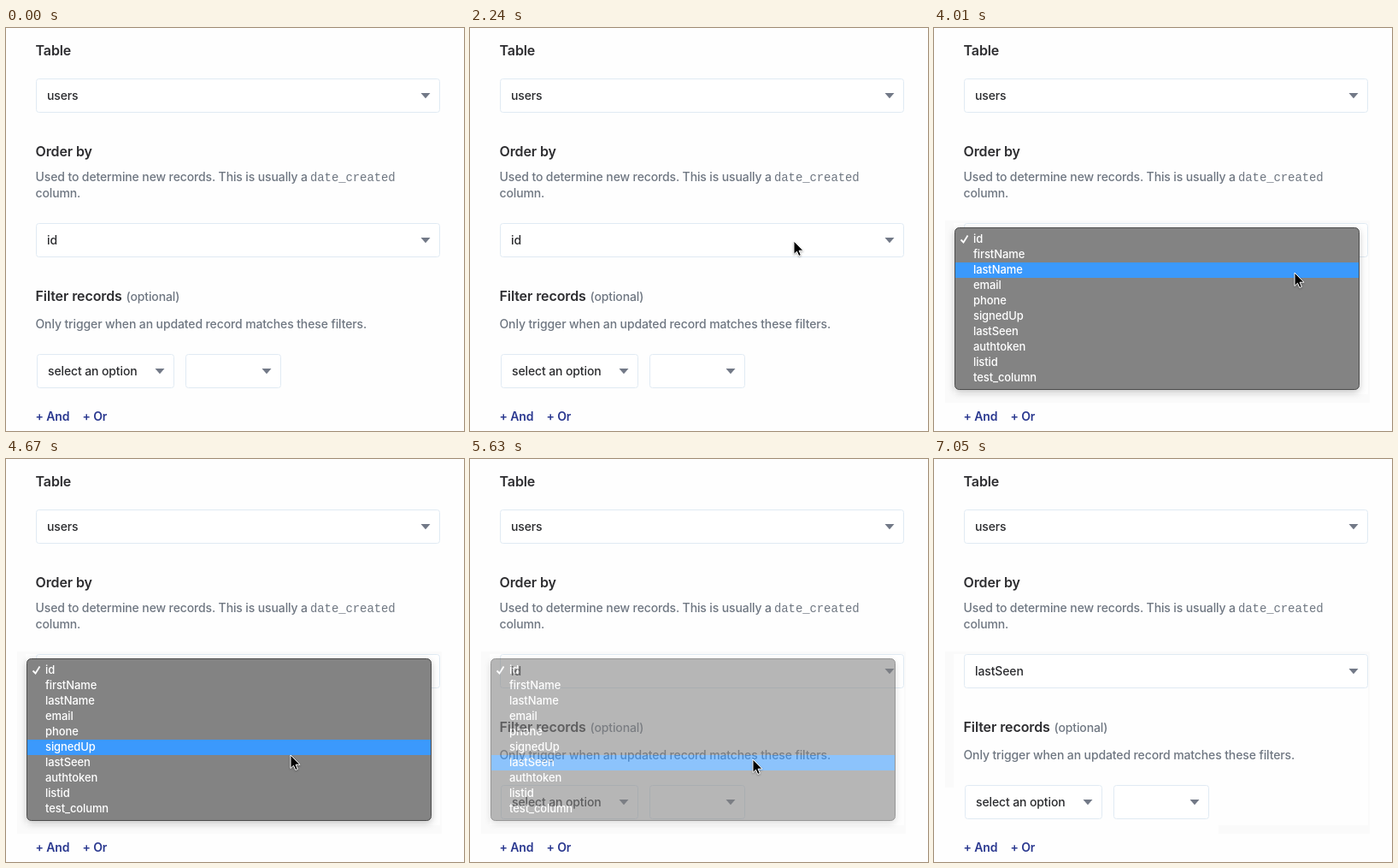
Animation of 536x471 px, one loop 8.91 s. Source, as an HTML page:

```html
<!DOCTYPE html>
<html lang="en">
<head>
<meta charset="utf-8">
<title>Order by menu</title>
<style>
  html, body { margin: 0; width: 100%; height: 100%; overflow: hidden; background: #fefefe; }
  svg { display: block; }
  text { font: 500 14px Inter, sans-serif; letter-spacing: -.12px; fill: #2b2c2f; }
  .title { font-weight: 600; font-size: 16px; letter-spacing: -.1px; fill: #2d2d30; }
  .note { fill: #6e7681; }
  .code { font: 14px "Liberation Mono", monospace; letter-spacing: -.1px; }
  .link { font-weight: 600; fill: #2b3990; }
  .box { fill: #fff; stroke: #e0eaf3; }
  .arrow { fill: #727987; }
  #menu text { font-size: 13px; letter-spacing: -.1px; fill: #fff; }
  #panel { fill: #838383; stroke: #4c4c4c; filter: drop-shadow(0 3px 4px rgba(0, 0, 0, .22)); }
  #cursor { filter: drop-shadow(0 1px 1px rgba(0, 0, 0, .3)); }
</style>
</head>
<body>
<svg width="536" height="471" viewBox="0 0 536 471">
  <g id="halo" fill="#fafafa">
    <path d="M13 225H510V228H23V384H13ZM508 228H510V438H333V428H508Z"/>
    <path id="haloCorner" d="M13 384H23V428H333V438H13Z"/>
  </g>
  <text class="title" x="34.5" y="32">Table</text>
  <text class="title" x="34.5" y="150">Order by</text>
  <text class="note" x="34.5" y="179">Used to determine new records. This is usually a</text>
  <text class="note code" x="356" y="179">date_created</text>
  <text class="note" x="34.5" y="198">column.</text>
  <text class="title" x="34.5" y="319">Filter records</text>
  <text class="note" x="140.5" y="319">(optional)</text>
  <text class="note" x="34.5" y="351">Only trigger when an updated record matches these filters.</text>
  <text class="link" x="34.5" y="459">+ And</text>
  <text class="link" x="89.5" y="459">+ Or</text>
  <g id="selects"></g>
  <g id="menu">
    <rect id="panel" x="24.5" y="233.5" width="473" height="189" rx="5"/>
    <rect id="highlight" x="25" width="472" height="18" fill="#3b99fc"/>
    <path d="M31.5 247.5L34.5 250.5 39.5 242.5" fill="none" stroke="#fff" stroke-width="1.8"/>
  </g>
  <path id="cursor" d="M0 0V15.5L3.5 12.2 5.8 17.5 8.4 16.4 6.1 11.2H11Z" stroke="#fff" stroke-width="1"/>
</svg>
<script>
const LOOP = 8910;
const ROW_TOP = 238, ROW_HEIGHT = 18;
const COLUMNS = ["id", "firstName", "lastName", "email", "phone", "signedUp",
  "lastSeen", "authtoken", "listid", "test_column"];

const $ = id => document.getElementById(id);

function add(parent, tag, attributes, content = "") {
  const node = document.createElementNS("http://www.w3.org/2000/svg", tag);
  for (const name in attributes) node.setAttribute(name, attributes[name]);
  node.textContent = content;
  parent.append(node);
  return node;
}

function addSelect(x, y, width, label) {
  const group = $("selects");
  add(group, "rect", { class: "box", x: x + .5, y: y + .5, width: width - 1, height: 39, rx: 3 });
  add(group, "path", { class: "arrow", d: `M${x + width - 22.5} ${y + 17}h11l-5.5 6.2z` });
  return add(group, "text", { x: x + 13, y: y + 25 }, label);
}

addSelect(35, 59, 473, "users");
const orderBy = addSelect(35, 228, 473, "id");
addSelect(36, 381, 161, "select an option");
addSelect(210, 381, 112, "");

COLUMNS.forEach((name, i) =>
  add($("menu"), "text", { x: 46, y: ROW_TOP + 13 + i * ROW_HEIGHT }, name));

const linear = u => u;
const easeIn = u => u * u;
const easeOut = u => 1 - (1 - u) ** 1.72;
const smooth = u => u * u * (3 - 2 * u);

// Cursor moves, each advancing in evenly spaced hard steps
const MOVES = [
  { start: 1190, end: 1600, steps: 8, from: [-12, 232], to: [181, 252], ease: easeOut },
  { start: 1890, end: 2710, steps: 15, from: [181, 252], to: [481, 248], ease: easeOut },
  { start: 3660, end: 4550, steps: 16, from: [481, 248], to: [335, 342], ease: smooth },
  { start: 4610, end: 4850, steps: 5, from: [335, 342], to: [331, 351], ease: linear },
  { start: 6580, end: 7050, steps: 9, from: [331, 351], to: [304, 474], ease: easeIn },
];

const MENU_OPEN = 2770, BLINK = 5450, BLINK_END = 5510, FADE = 5570, MENU_CLOSED = 5800;

function cursorAt(t) {
  const move = MOVES.findLast(m => t >= m.start);
  if (!move) return [-20, 232];
  const { start, end, steps, from, to, ease } = move;
  const step = Math.floor((t - start + 5) / (end - start) * (steps - 1)) + 1;
  const u = ease(Math.min(step / steps, 1));
  return from.map((a, i) => a + (to[i] - a) * u);
}

function menuOpacity(t) {
  if (t < MENU_OPEN || t >= MENU_CLOSED) return 0;
  if (t < FADE) return 1;
  return .8 - .22 * Math.floor((t - FADE) / 60);
}

function show(id, visible) {
  $(id).style.display = visible ? "" : "none";
}

function draw(t) {
  const [x, y] = cursorAt(t);
  $("cursor").setAttribute("transform", `translate(${Math.round(x)} ${Math.round(y)})`);

  const row = Math.floor((y - ROW_TOP) / ROW_HEIGHT);
  $("highlight").setAttribute("y", ROW_TOP + row * ROW_HEIGHT);
  show("highlight", t < BLINK || t >= BLINK_END);
  $("menu").style.opacity = menuOpacity(t);

  orderBy.textContent = t < MENU_CLOSED ? "id" : "lastSeen";
  show("halo", t >= MENU_OPEN);
  show("haloCorner", y < 384);
}

function frame() {
  draw(performance.now() % LOOP);
  requestAnimationFrame(frame);
}
frame();
</script>
</body>
</html>
```
